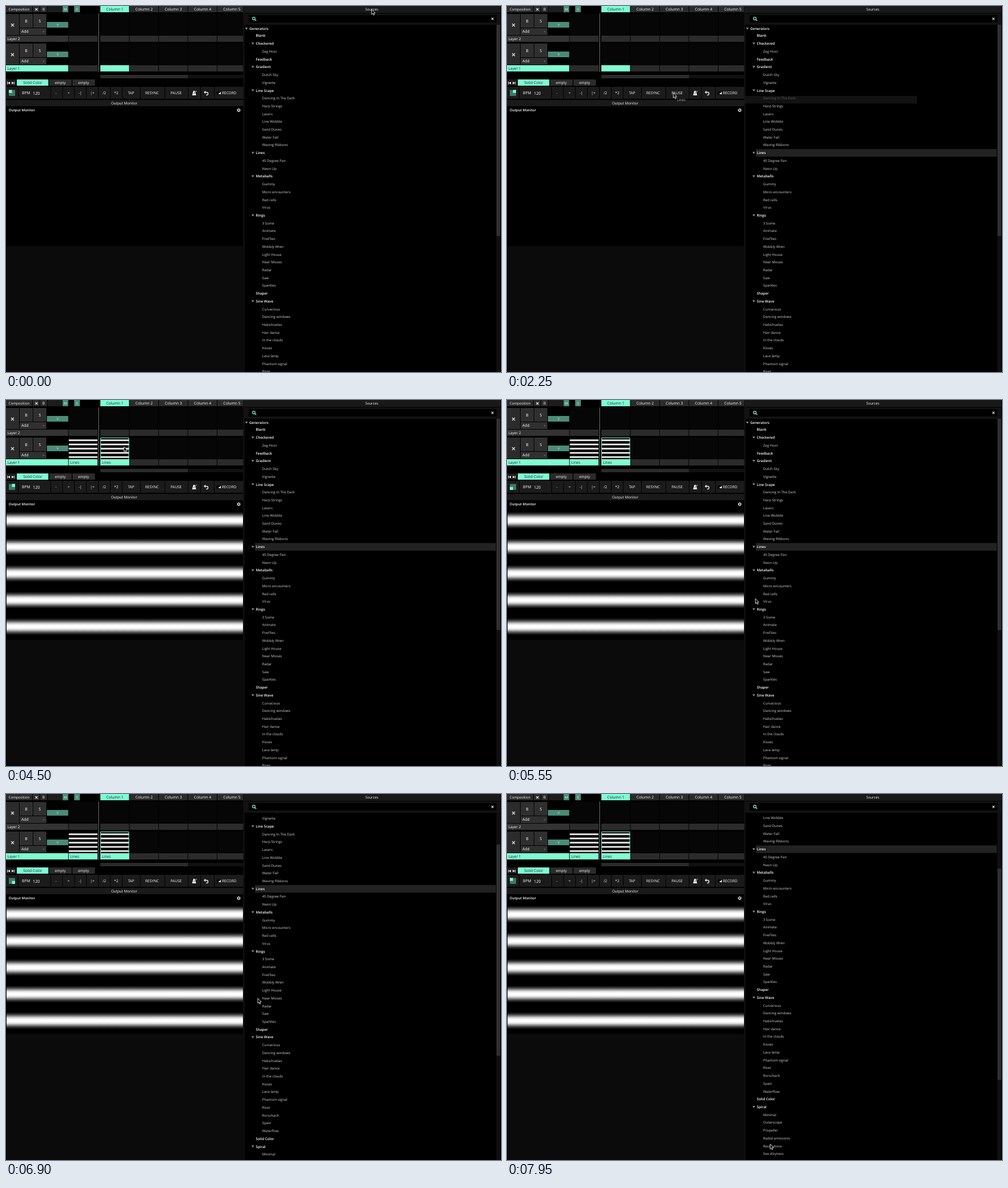
An HTML page with a canvas for the animation above (8 s loop, 871 by 643 pixels).

```html
<!DOCTYPE html>
<html lang="en">
<head>
<meta charset="utf-8">
<title>Sources panel</title>
<style>
html, body { margin: 0; height: 100%; overflow: hidden; background: #000; }
canvas { display: block; }
</style>
</head>
<body>
<canvas id="stage" width="871" height="643"></canvas>
<script>
const g = document.getElementById('stage').getContext('2d');
g.textRendering = 'geometricPrecision';

const LOOP = 8000, ACCENT = '#7ffcd2', TEAL = '#4b8b78', GREY = '#2b2b2b';
const ROW_HEIGHT = 13.72, LIST_TOP = 33, SELECTED = 16;
const SELECT_AT = 1750, DROP_AT = 2850, PLAY_AT = 3800;
const GRAB = [453, 259], DRAG_LAG = 47;

// '+' marks an open folder, '-' a top-level entry without children.
const rows = `+Generators,-Blank,+Checkered,Zeg Hoor,-Feedback,+Gradient,Dutch Sky,Vignette,+Line Scape,
Dancing In The Dark,Harp Strings,Lasers,Line Wobble,Sand Dunes,Water Fall,Waving Ribbons,+Lines,45 Degree Pan,
Neon Up,+Metaballs,Gummy,Micro encounters,Red cells,Virus,+Rings,3 Some,Animate,FireFlies,Wobbly Wren,
Light House,Near Misses,Radar,Saw,Sparkles,-Shaper,+Sine Wave,Curvacious,Dancing windows,Habichuelas,
Hair dance,In the clouds,Kisses,Lava lamp,Phantom signal,River,Rorschach,Spain,Waterflow,-Solid Color,
+Spiral,Minimal,Outerscope,Propeller,Radial emissions,Revolutions,Sea dizyness`.split(/,\s*/);

const cursorKeys = [
  [0, 643.5, 6], [950, 474, 245], [1550, ...GRAB], [SELECT_AT, ...GRAB], [2550, 219, 104], [2800, 207.5, 82],
  [4550, 207.5, 82], [5550, 437, 349], [5850, 443, 359], [7350, 443, 359], [7900, 463, 615]
];
const scrollKeys = [[6150, 0], [6900, 91.5], [7500, 161]];
const columns = [0, 1, 2, 3, 4].map(i => 166 + i * 51.5);

// Eased interpolation through [time, ...values] keys.
function follow(keys, t) {
  if (t <= keys[0][0]) return keys[0].slice(1);
  const next = keys.findIndex(k => k[0] > t);
  if (next < 0) return keys[keys.length - 1].slice(1);
  const a = keys[next - 1], b = keys[next];
  const u = (t - a[0]) / (b[0] - a[0]), s = u * u * (3 - 2 * u);
  return a.slice(1).map((v, i) => v + (b[i + 1] - v) * s);
}

function box(x, y, w, h, color) {
  g.fillStyle = color;
  g.fillRect(x, y, w, h);
}

function text(str, x, y, { size = 6.5, color = '#fff', weight = 400, align = 'left' } = {}) {
  g.font = `${weight} ${size}px "Open Sans", "Noto Sans", sans-serif`;
  g.textAlign = align;
  g.fillStyle = color;
  g.fillText(str, x, y + size * 0.36);
}

function label(str, x, y, options) {
  text(str, x, y, { align: 'center', ...options });
}

function shape(points, color) {
  g.beginPath();
  points.forEach(p => g.lineTo(...p));
  g.closePath();
  g.fillStyle = color;
  g.fill();
}

function stroke(color, width, draw) {
  g.strokeStyle = color;
  g.lineWidth = width;
  g.beginPath();
  draw();
  g.stroke();
}

function cross(x, y, r, width = 1.1) {
  stroke('#eee', width, () => {
    g.moveTo(x - r, y - r); g.lineTo(x + r, y + r);
    g.moveTo(x + r, y - r); g.lineTo(x - r, y + r);
  });
}

function stripes(x, y, w, h) {
  const fill = g.createLinearGradient(0, y, 0, y + h);
  const profile = [[0.18, 0], [0.25, 45], [0.32, 125], [0.39, 215], [0.46, 255]];
  for (let i = 0; i < 5; i++) {
    const add = (p, v) => fill.addColorStop((i + p) / 5, `rgb(${v},${v},${v})`);
    profile.forEach(([p, v]) => add(p, v));
    [...profile].reverse().forEach(([p, v]) => add(1 - p, v));
  }
  box(x, y, w, h, fill);
}

function drawHeader() {
  box(0, 0, 46, 11, GREY);
  text('Composition', 4.5, 6, { size: 6.2 });
  box(47, 0, 12, 11, GREY);
  cross(53.5, 6, 2);
  box(60, 0, 12, 11, GREY);
  label('B', 66, 6);
  box(73, 0, 26, 11, '#1c1c1c');
  [['M', 104.5], ['S', 125]].forEach(([s, x]) => {
    box(x - 5, 0, 10, 11, TEAL);
    label(s, x, 6, { size: 6 });
  });
  columns.forEach((x, i) => {
    box(x, 0, 50.5, 11, i ? GREY : ACCENT);
    label('Column ' + (i + 1), x + 25.4, 6, { size: 6.8, color: i ? '#fff' : '#123' });
  });
}

function drawLayer(y, name, active) {
  box(0, y, 23, 37, GREY);
  cross(11.5, y + 19.5, 2.5);
  [['B', 24], ['S', 48]].forEach(([s, x]) => {
    box(x, y, 23, 24, '#2f2f2f');
    label(s, x + 11.5, y + 12.5, { size: 7 });
  });
  box(24, y + 25, 47, 12, '#303030');
  text('Add', 27, y + 31, { size: 6.8 });
  shape([[64.5, y + 30.5], [68, y + 30.5], [66.2, y + 32.5]], '#777');
  box(72, y + 14, 37.5, 10, TEAL);
  label('V', 91, y + 19, { size: 5.5, color: '#cfe' });
  box(0, y + 38, 109.5, 11, active ? ACCENT : '#333');
  text(name, 2.5, y + 44, { color: active ? '#123' : '#fff' });
  [110.5, ...columns].forEach(x => {
    box(x, y, 50.5, 37, '#060606');
    box(x, y + 38, 50.5, 11, GREY);
  });
}

function drawClip(x, selected) {
  stripes(x, 67, 50.5, 37);
  box(x, 104, 50.5, 11, ACCENT);
  text('Lines', x + 2.5, 110, { color: '#123' });
  if (selected) stroke(ACCENT, 1, () => g.rect(x + 0.5, 66.5, 49.5, 48));
}

function drawLayers(t) {
  drawLayer(14, 'Layer 2', false);
  drawLayer(66, 'Layer 1', true);
  box(166, 104, 50.5, 11, ACCENT);
  box(162.3, 13, 1.5, 103, '#555');
  if (t >= DROP_AT) drawClip(166, t >= PLAY_AT);
  if (t >= PLAY_AT) drawClip(110.5, false);
  box(166, 121, 252, 6, '#111');
  box(166, 121, 154, 6, GREY);
}

function drawDecks() {
  box(0, 129, 18, 11, '#1c1c1c');
  [1, -1].forEach(dir => {
    const x = dir > 0 ? 4.7 : 12.3;
    shape([[x - 1.5 * dir, 135.3], [x + 2.3 * dir, 133], [x + 2.3 * dir, 137.6]], '#eee');
    box(x - 2 * dir - 0.5, 133, 1, 4.6, '#eee');
  });
  box(19, 129, 55.5, 11, ACCENT);
  label('Solid Color', 47, 135, { size: 6.7, color: '#123' });
  [76, 117].forEach(x => {
    box(x, 129, 39.5, 11, GREY);
    label('empty', x + 19.5, 135);
  });
}

function drawToolbar(t) {
  box(0, 142, 418, 21, '#1b1b1b');
  [21, 78, 99, 120, 141, 162, 183, 204, 236, 279, 320, 342, 366].forEach(x => box(x, 142, 1, 21, '#000'));

  // Beat indicator: one lit quarter moving clockwise.
  const beat = Math.floor((t + 246.5) / 499.5) % 4;
  box(5, 147.5, 11, 10.5, '#3f7767');
  box(beat === 1 || beat === 2 ? 10.5 : 5, beat < 2 ? 147.5 : 152.8, 5.5, 5.2, ACCENT);

  text('BPM', 28, 153, { size: 6.8 });
  text('120', 47, 153, { size: 7.3 });
  [['-', 88], ['+', 110], ['-|', 130.5], ['|+', 152], ['/2', 173], ['*2', 194], ['TAP', 220],
    ['RESYNC', 257], ['PAUSE', 299.3]].forEach(([s, x]) => label(s, x, 153));

  shape([[327.5, 157], [329.7, 149], [332.3, 149], [334.5, 157]], '#eee');
  stroke('#1b1b1b', 1, () => { g.moveTo(330.5, 155); g.lineTo(334, 149); });
  stroke('#eee', 1, () => { g.moveTo(331.5, 154); g.lineTo(335.2, 149); });
  stroke('#eee', 1.3, () => {
    g.moveTo(349.5, 151.5); g.lineTo(353, 151.5);
    g.arc(353, 154, 2.5, -Math.PI / 2, Math.PI * 0.6);
  });
  shape([[348, 151.5], [351, 148.8], [351, 154.2]], '#eee');
  g.beginPath();
  g.arc(373.5, 153, 3.2, 0, 7);
  g.fillStyle = '#050505';
  g.fill();
  shape([[373.5, 154], [376, 152.5], [378, 151], [378, 155], [375, 155]], '#eee');
  text('RECORD', 380, 153);
}

function drawMonitor(t) {
  box(0, 165, 418, 11, '#1a1a1a');
  label('Output Monitor', 208, 170.5, { size: 6.3 });
  text('Output Monitor', 4.8, 182.5, { size: 6.1, weight: 600 });
  stroke('#ddd', 1.4, () => g.arc(409.5, 183, 1.9, 0, 7));
  for (let i = 0; i < 8; i++) {
    const a = i * Math.PI / 4, c = Math.cos(a), s = Math.sin(a);
    stroke('#ddd', 1, () => { g.moveTo(409.5 + c * 2, 183 + s * 2); g.lineTo(409.5 + c * 3.4, 183 + s * 3.4); });
  }
  if (t >= PLAY_AT) stripes(1, 188, 416, 233.5);
  box(1, 421.5, 416, 222, '#0b0b0b');
}

function drawSources(t) {
  box(417.5, 0, 454, 643, '#000');
  box(417.5, 0, 2, 643, '#151515');
  box(419, 0, 451, 12, '#191919');
  label('Sources', 643.5, 6, { size: 6.2 });
  box(419, 13, 451, 20, '#121212');
  box(427, 16, 436, 13, '#000');
  stroke(ACCENT, 1.2, () => {
    g.arc(436, 22, 2.4, 0, 7);
    g.moveTo(437.8, 23.8); g.lineTo(440.3, 26.2);
  });
  cross(856, 22.5, 1.8);

  const [scroll] = follow(scrollKeys, t);
  g.save();
  g.beginPath();
  g.rect(419, LIST_TOP, 452, 643 - LIST_TOP);
  g.clip();
  rows.forEach((row, i) => {
    const y = (i ? 38.5 + i * ROW_HEIGHT : 39.7) - scroll;
    if (y < 20 || y > 655) return;
    if (i === SELECTED && t >= SELECT_AT) box(438, y - 6.7, 424, 13.4, '#222');
    const kind = row[0], name = row.replace(/^[+-]/, '');
    if (name === row) return text(name, 450.8, y, { size: 6.1, color: '#d4d4d4' });
    text(name, i ? 439.5 : 428, y, { size: 6.25, weight: 600 });
    const x = i ? 434.3 : 423;
    if (kind === '+') shape([[x - 2.4, y - 1.8], [x + 2.4, y - 1.8], [x, y + 2]], '#888');
  });
  box(863, LIST_TOP, 6.5, 610, '#101010');
  box(863, LIST_TOP + scroll * 0.61, 6.5, 371, '#303030');
  g.restore();
}

function drawDragged(t) {
  if (t < SELECT_AT + DRAG_LAG || t >= DROP_AT) return;
  const [cx, cy] = follow(cursorKeys, t - DRAG_LAG);
  const dx = cx - GRAB[0], y = 258 + cy - GRAB[1];
  const left = Math.max(418, 438 + dx);
  g.globalAlpha = 0.65;
  box(left, y - 7, 862 + dx - left, 13.4, '#1d1d1d');
  text('Lines', 439.5 + dx, y, { size: 6.25 });
  g.globalAlpha = 1;
}

function drawCursor(t) {
  const [x, y] = follow(cursorKeys, t);
  const outline = [[0, 0], [0, 8.6], [2, 6.9], [3.4, 10], [4.9, 9.3], [3.5, 6.3], [6.2, 6.2]];
  shape(outline.map(([a, b]) => [x + a, y + b]), '#000');
  g.strokeStyle = '#e8e8e8';
  g.lineWidth = 0.9;
  g.stroke();
}

function frame() {
  const t = performance.now() % LOOP;
  box(0, 0, 871, 643, '#000');
  drawHeader();
  drawLayers(t);
  drawDecks();
  drawToolbar(t);
  drawMonitor(t);
  drawSources(t);
  drawDragged(t);
  drawCursor(t);
  requestAnimationFrame(frame);
}
frame();
</script>
</body>
</html>
```
